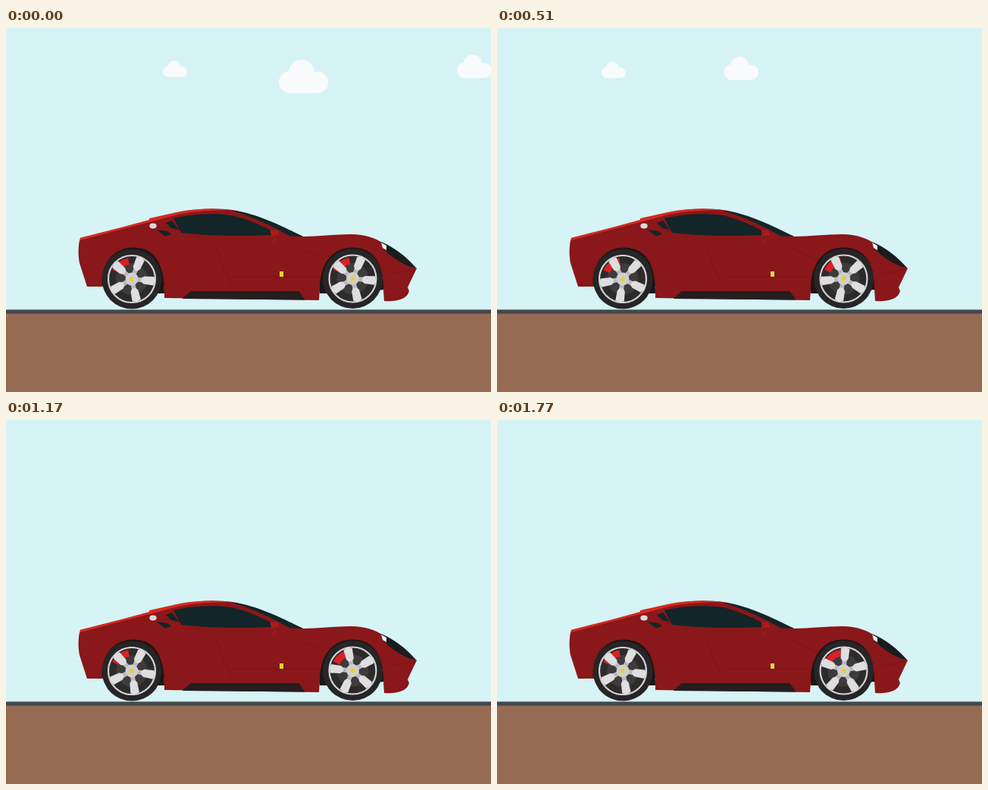
An HTML page for the animation above (1800 ms loop, 640x480 px).

```html
<!DOCTYPE html>
<html lang="en">
<head>
<meta charset="utf-8">
<title>Red car</title>
<style>
  html, body { margin: 0; width: 100%; height: 100%; overflow: hidden; background: #d6f3f6; }
  svg { display: block; width: 100%; height: 100%; }
</style>
</head>
<body>
<svg viewBox="0 0 640 480">
  <defs>
    <g id="cloud" fill="#f9fafb">
      <circle cx="10.3" cy="20.7" r="10.3"/>
      <circle cx="21" cy="12" r="12"/>
      <circle cx="36" cy="21" r="10"/>
      <path d="M10 14H36V31H10Z"/>
    </g>
    <g id="spoke">
      <path d="M5 -3H14V3H5Z" fill="#b9b9bb"/>
      <path d="M12.5 -2.5L16 -5L29 -5.8L31 0L29 5.8L16 5L12.5 2.5Z"/>
    </g>
    <g id="tyre">
      <circle r="39.5" fill="#272526"/>
      <circle r="31" fill="#2c2a2b" stroke="#d2d2d4" stroke-width="2.2"/>
      <circle r="21" fill="#3d3b3c"/>
      <path d="M-21.5 -10A23.7 23.7 0 0 1 -4 -23.4" fill="none" stroke="#dc2024" stroke-width="9"/>
    </g>
    <g id="rim" fill="#dedee0">
      <use href="#spoke"/>
      <use href="#spoke" transform="rotate(72)"/>
      <use href="#spoke" transform="rotate(144)"/>
      <use href="#spoke" transform="rotate(216)"/>
      <use href="#spoke" transform="rotate(288)"/>
      <circle r="8.5" fill="#cfcfd1"/>
      <circle r="3" fill="#e8cf2e"/>
    </g>
  </defs>

  <rect width="640" height="480" fill="#d6f3f6"/>
  <g id="sky"></g>
  <rect y="376" width="640" height="104" fill="#966b54"/>
  <rect y="371.4" width="640" height="5.3" fill="#43494d"/>

  <!-- body -->
  <path fill="#8a1719" d="M98 277L150 264L190 253L225 243.5C250 238 280 237 305 241
    C333 247 365 262 392 275C412 275 432 272 456 272C474 272 487 277 500 285
    C515 294 530 305 542 317L530 342L532 347C529 358 515 361 499 360L498 345
    L414 345L413 359L209 356V341H107L97 310C95 300 95 285 98 277Z"/>
  <path fill="#d42a20" d="M98 276.7L150 263.5L189 253V251L225 243C250 237.5 280 237 300 240.5
    C275 239.8 250 241.5 227 246L195 254.5L150 266L98 280Z"/>
  <g fill="#122528">
    <path d="M297 240.5C328 243.5 360 259 392 275L375 274.5C352 262 327 249 297 240.5Z"/>
    <path d="M221 251C245 245 282 243 304 248.5C323 254 338 261 349 267L350 273C320 274.5 260 274 231 270Z"/>
    <path d="M211 257L219 254L228 266L218 264Z"/>
    <path d="M198 266L213 268L218 272L210 274.5Z"/>
  </g>
  <path fill="#1a1c1e" d="M495 282C512 289 528 301 541 316.5L531 314C515 306 505 299 497 290Z"/>
  <ellipse cx="194" cy="261" rx="4.7" ry="3.4" fill="#dadada"/>
  <path fill="#a51d1c" d="M349 267L358 266L361 273L350 275Z"/>
  <path fill="none" stroke="#c02522" d="M356 277L352 283"/>
  <path fill="#f4f2ea" d="M495 283L502 287V293L497 290Z"/>
  <path fill="none" stroke="#721114" opacity=".65"
    d="M277 290C284 300 280 312 299 338M300 328H414M385 288L421 306M505 325L541 318"/>
  <path fill="#241e1f" d="M232.5 357L243.5 347H386.5L394.5 358.5Z"/>
  <rect x="361" y="321" width="5" height="7" fill="#e6d43a"/>

  <!-- wheel arches -->
  <g fill="#1c1516">
    <path d="M126.5 338C126 308 143 289.5 168 289.5C194 289.5 209 308 209 350H166Z"/>
    <path d="M414 350C412 312 430 289.5 457 289.5C484 289.5 498 308 498 345L458 350Z"/>
  </g>
  <g transform="translate(166 331)"><use href="#tyre"/><use href="#rim" id="rear"/></g>
  <g transform="translate(457.5 330.5)"><use href="#tyre"/><use href="#rim" id="front"/></g>
</svg>
<script>
const LOOP = 1800, STEP = 30;
const byId = id => document.getElementById(id);

// speeds in px per ms; fade lists [time, opacity] pairs
const clouds = [
  { x: 360, y: 42, vx: -0.936, vy: 0.012, size: 1.42, fade: [[0, 1], [330, 0.5], [480, 0.4]] },
  { x: 207, y: 43, vx: -0.136, vy: 0.0025, size: 0.7, fade: [[510, 1], [750, 0.6], [990, 0.45], [1200, 0]] },
  { x: 595, y: 35, vx: -0.58, vy: 0.005, size: 1, fade: [[0, 1]] }
];

// start angle in degrees, spin in degrees per ms
const wheels = [
  { node: byId('rear'), angle: 5.5, spin: -0.2425 },
  { node: byId('front'), angle: 5, spin: -0.092 }
];

for (const c of clouds) {
  c.node = document.createElementNS('http://www.w3.org/2000/svg', 'use');
  c.node.setAttribute('href', '#cloud');
  byId('sky').append(c.node);
}

function level(points, t) {
  let [t0, v0] = points[0];
  for (const [t1, v1] of points) {
    if (t < t1) return t <= t0 ? v0 : v0 + (v1 - v0) * (t - t0) / (t1 - t0);
    [t0, v0] = [t1, v1];
  }
  return v0;
}

function draw(now) {
  const t = Math.floor(now % LOOP / STEP) * STEP;
  for (const c of clouds) {
    c.node.setAttribute('transform',
      `translate(${c.x + c.vx * t} ${c.y + c.vy * t}) scale(${c.size})`);
    c.node.setAttribute('opacity', level(c.fade, t));
  }
  for (const w of wheels) {
    w.node.setAttribute('transform', `rotate(${w.angle + w.spin * t})`);
  }
}

const start = performance.now();
function tick() {
  draw(performance.now() - start);
  requestAnimationFrame(tick);
}
tick();
</script>
</body>
</html>
```
